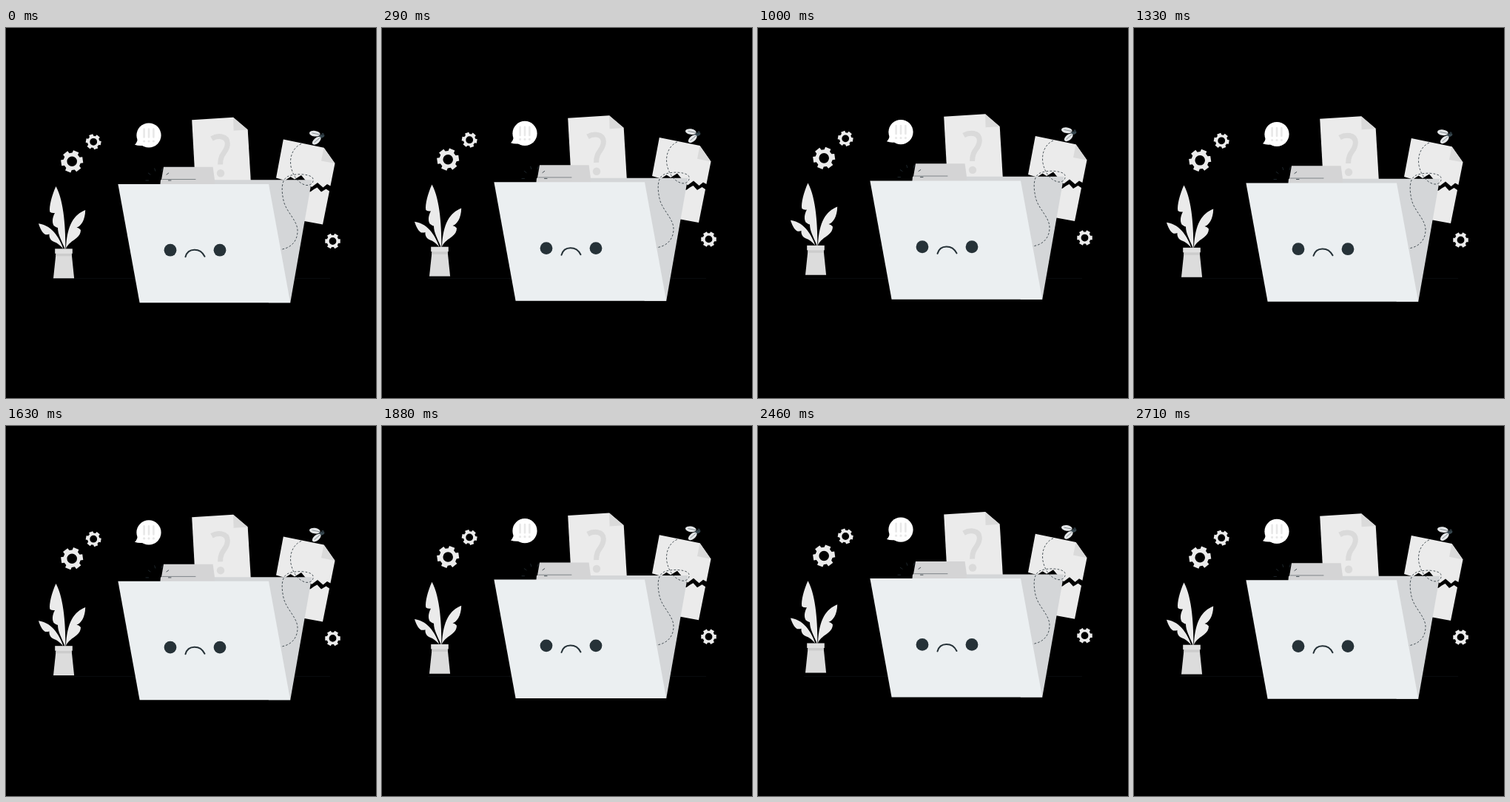
These frames come from a looping animation (500 px wide and 500 px high, 2750 ms). An HTML page:

```html
<!DOCTYPE html>
<html lang="en">
<head>
<meta charset="utf-8">
<title>Sad folder</title>
<style>
  html, body { margin: 0; width: 100%; height: 100%; overflow: hidden; background: #000; }
  svg { display: block; width: 100vw; height: 100vh; }
  .ink { fill: none; stroke: #263238; stroke-linecap: round; }
  .paper { fill: #ebebeb; }
  .fold { fill: #dadada; }
</style>
</head>
<body>
<svg viewBox="0 0 500 500">
  <path d="M62 338.4H438" stroke="#12171a" stroke-width=".6"/>
  <g id="float">
    <g id="gears" class="paper" fill-rule="evenodd"></g>

    <g id="plant">
      <g class="paper">
        <path d="M67.500 214C62 226 58 241 59.300 248.500Q62 250.500 66 250C62.500 256 62 263 64.500 267Q67.500 269.500 70 270C70 279 75 287 79.600 298.500H80.400C80.500 275 79 235 67.500 214Z"/>
        <path d="M44 264.300C46 271 49 277 53 279Q56 279.500 58.500 278.500C58 284 61 287.500 65 289Q71 291 77.500 298.500C73.500 287 64 267 44 264.300Z"/>
        <path d="M107.200 246C92 252 82.500 266 81 298C84 291 90 288 95 284C99 281 101 277 101 273Q99 270 95.500 269.500C101 268 107 260 107.200 246Z"/>
      </g>
      <path fill="#dcdcdc" d="M67.600 304H88.600L92.100 338.200H64Z"/>
      <path fill="#cccccc" d="M67.600 304.500H88.600L89 308.300H67.200Z"/>
      <path fill="#e0e0e0" d="M66.200 298.300H89.800V304.800H66.200Z"/>
    </g>

    <g id="bubble" fill="#fff">
      <path d="M178 148Q178 154 174 157.800Q180 160 188 158.500Z"/>
      <circle cx="193" cy="145" r="16.600"/>
      <g fill="none" stroke="#e8e8e8" stroke-linecap="round">
        <path stroke-width="2.600" d="M186.600 136.500V147.500M193 136.500V147.500M199.400 136.500V147.500"/>
        <path stroke-width="3.200" d="M186.600 153h.01M193 153h.01M199.400 153h.01"/>
      </g>
    </g>

    <g id="query">
      <path class="paper" d="M251.200 124.300L307 120.800L326.700 137.600L330.900 208H255.800Z"/>
      <path class="fold" d="M307 120.800L307.600 138.800L326.700 137.600Z"/>
      <path fill="none" stroke="#dadada" stroke-width="7" d="M278 149.500C286 145 299 145 299.300 156C299.600 168 289.300 168 289.600 184.500"/>
      <circle cx="290" cy="196.300" r="5.200" fill="#dadada"/>
    </g>

    <g id="torn">
      <path class="paper" d="M374.800 150.500L429.500 161.700L444.500 183L438.400 213.500L434 211L428.500 215.500L421 209L413 215L404 205L399 199L390 204.500L384.500 201L377 206L365 202.500Z"/>
      <path class="fold" d="M429.500 161.700L426 179.400L444.500 183Z"/>
      <path class="paper" d="M405 222L411.500 221.300L416 218L420.500 215.500L426 221.500L432.500 217.500L437 220.500L428 265.500L398 260Z"/>
    </g>

    <path fill="#d4d6d8" d="M208 216L209 205.300H413.300L384.200 371.300H355Z"/>
    <path fill="#d4d4d5" d="M209 211L213 187.800H279.600L282 205.300V211Z"/>
    <path class="ink" stroke-width=".5" d="M211 204.500H256"/>
    <g id="rays" class="ink" stroke-width=".8"></g>

    <path class="ink" stroke-width=".8" stroke-dasharray="2.800 2.200" style="stroke-linecap:butt"
      d="M399 156.500C387 162 383 175 385 187C388 202 397 211 406 212.500C414 213 417 206 414 202C409 197 390 196 380 201C372 206 372 219 375 233C378 248 394 260 394 274C394 289 384 298 370 299.500"/>

    <g id="fly">
      <ellipse cx="426" cy="146.500" rx="4.600" ry="2.200" transform="rotate(-22 426 146.500)" fill="#37474f"/>
      <circle cx="428" cy="143.500" r="1.700" fill="#263238"/>
      <ellipse cx="417.300" cy="142.700" rx="7.400" ry="3.800" transform="rotate(8 417.300 142.700)" fill="#e3e6e8"/>
      <ellipse cx="419.700" cy="152.300" rx="7" ry="3.700" transform="rotate(-40 419.700 152.300)" fill="#e3e6e8"/>
      <path class="ink" stroke-width=".5" d="M424 144L414 142M424 148.500L417 154.500"/>
    </g>

    <path fill="#ebeff1" d="M151.400 210.900H355L384.200 371.300H180.600Z"/>
    <g fill="#263238">
      <circle cx="222" cy="300.200" r="8.400"/>
      <circle cx="289" cy="300.200" r="8.400"/>
    </g>
    <path class="ink" stroke-width="2" d="M242.500 309.300C246 296.800 262.500 296.800 268.500 308.800"/>
  </g>
</svg>
<script>
const LOOP = 2750, FPS = 24, PERIOD = 1500, LIFT = 20 / 3;
const NS = "http://www.w3.org/2000/svg";
const float = document.getElementById("float");

function addPath(id, d) {
  const path = document.createElementNS(NS, "path");
  path.setAttribute("d", d);
  document.getElementById(id).append(path);
}

function polar(cx, cy, r, deg) {
  const a = deg * Math.PI / 180;
  return (cx + r * Math.cos(a)).toFixed(2) + " " + (cy + r * Math.sin(a)).toFixed(2);
}

function gear(cx, cy, r, hole, turn) {
  const teeth = 6, pts = [];
  for (let i = 0; i < teeth; i++) {
    const mid = turn + i * 360 / teeth;
    for (const [k, da] of [[0.77, -20], [1, -15], [1, 15], [0.77, 20]])
      pts.push(polar(cx, cy, r * k, mid + da));
  }
  addPath("gears", `M${pts.join("L")}Z M${cx - hole} ${cy}` +
    `a${hole} ${hole} 0 1 0 ${2 * hole} 0a${hole} ${hole} 0 1 0 ${-2 * hole} 0Z`);
}

gear(89.2, 180.3, 15.2, 6.8, -8);
gear(118.2, 153.8, 10.6, 4.9, 10);
gear(441.5, 288, 10.6, 4.9, 0);

for (let deg = -180; deg <= 0; deg += 36)
  addPath("rays", `M${polar(206, 206, 13.5, deg)}L${polar(206, 206, 17, deg)}`);

// Linear rise and fall, stepped at the frame rate
function lift(t) {
  const step = Math.floor((t + 5) * FPS / 1000 - 1e-6) % (LOOP * FPS / 1000);
  const phase = (step * 1000 / FPS % PERIOD) / PERIOD;
  return LIFT * (1 - Math.abs(1 - 2 * phase));
}

let start;
function draw(now) {
  start ??= now;
  const y = lift((now - start) % LOOP);
  float.setAttribute("transform", `translate(0 ${(-y).toFixed(3)})`);
  requestAnimationFrame(draw);
}
requestAnimationFrame(draw);
</script>
</body>
</html>
```
